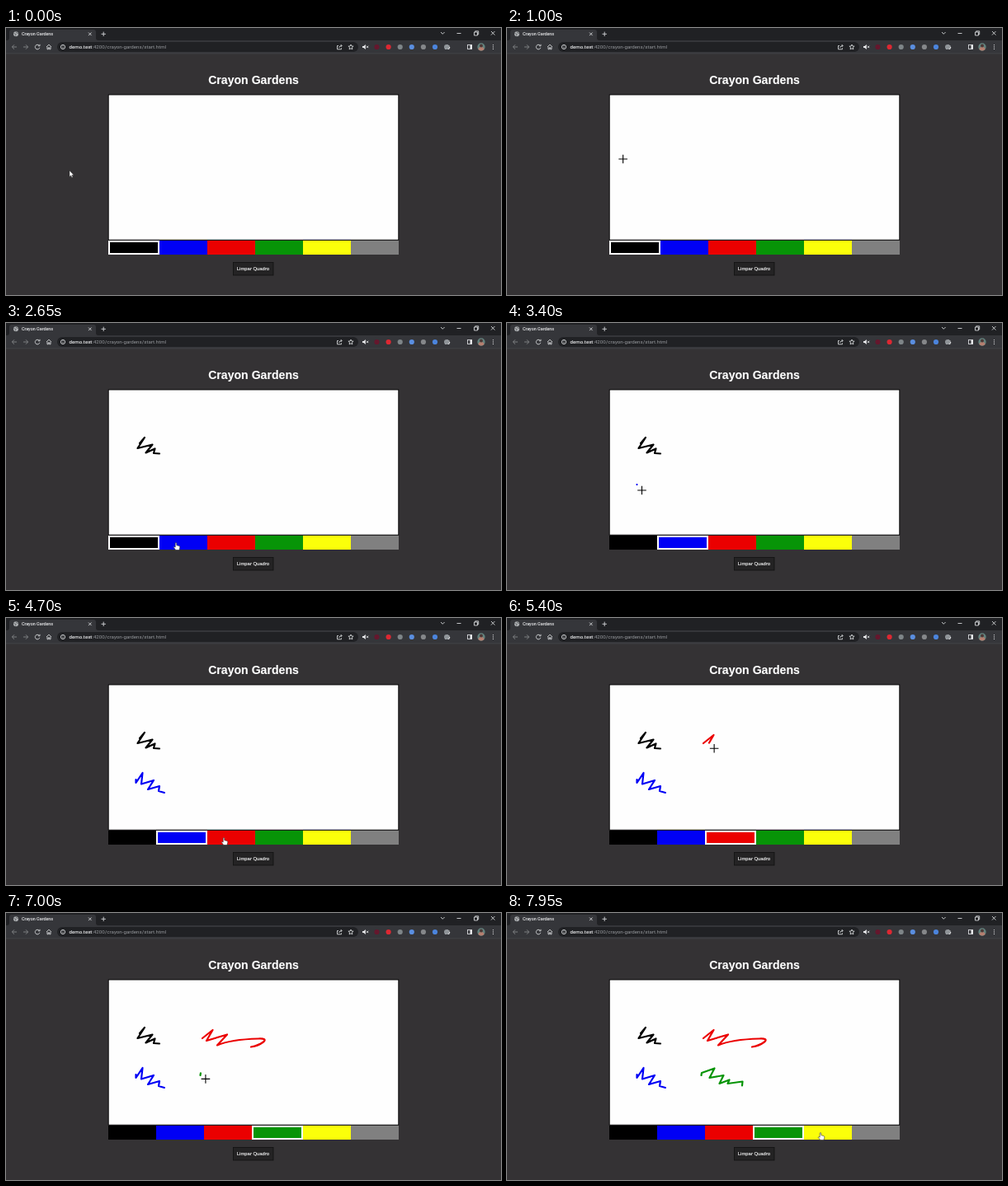
An HTML page that plays this animation: 600 by 324 pixels, repeating every 8 s.

```html
<!DOCTYPE html>
<html lang="pt">
<head>
<meta charset="utf-8">
<title>Crayon Gardens</title>
<style>
  html, body { margin: 0; width: 100%; height: 100%; overflow: hidden; background: #343234; }
  svg { display: block; width: 100vw; height: 100vh; }
  text { font-family: Roboto, sans-serif; fill: #e8e9eb; stroke: #e8e9eb; stroke-width: .12; }
  .muted { fill: #96999d; stroke: none; }
  .page { font-family: "Liberation Sans", Arial, sans-serif; text-anchor: middle; fill: #fff; }
  .icon { fill: none; stroke: #d4d6d9; stroke-width: .9; }
  .solid { fill: #e8e9eb; }
  .dim { stroke: #85878a; }
  .ink { fill: none; stroke-width: 2.2; stroke-linecap: round; stroke-linejoin: round; }
</style>
</head>
<body>
<svg viewBox="0 0 600 324">
  <rect width="600" height="324" fill="#343234"/>

  <!-- browser bar -->
  <rect width="600" height="16" fill="#202124"/>
  <path d="M1 15Q4 15 4 12V5Q4 2 7 2H106Q109 2 109 5V12Q109 15 112 15Z" fill="#35363a"/>
  <rect y="15" width="600" height="16" fill="#35363a"/>
  <rect y="30.6" width="600" height=".7" fill="#48494c"/>
  <rect x="62" y="17" width="365" height="12" rx="6" fill="#202124"/>
  <circle cx="12" cy="7.3" r="3" fill="#aeb0b3"/>
  <path d="M9.5 6.5l2.5 1-.5 2M12 4.6l1 1.5 1.8.3" fill="none" stroke="#55575a" stroke-width=".8"/>
  <text x="19" y="9.2" font-size="5.4">Crayon Gardens</text>
  <text x="76.5" y="25.2" font-size="6.2">demo.test<tspan class="muted">:4200/crayon-gardens/start.html</tspan></text>
  <g class="icon">
    <path d="M100 5.5l3.6 3.6m0-3.6l-3.6 3.6M115.5 7.3h5.4m-2.7-2.7v5.4"/>
    <path d="M527 5l2.3 2.3L531.6 5M546.5 6.5h5M588 4l4.5 4.5m0-4.5L588 8.500"/>
    <path d="M567.5 5h4v4h-4zm1.2 0V3.8h4v4h-1.200"/>
    <path class="dim" d="M13 23H7.500M10 20.300L7.300 23l2.700 2.700M21 23h5.500M24 20.300l2.700 2.700-2.700 2.700"/>
    <path d="M40.200 21.200A2.800 2.800 0 1 0 40.800 23.800M41 19.800v2h-2"/>
    <path d="M49 23l3-2.800 3 2.800m-5 0v2.800h1.300v-2h1.400v2H54V23"/>
  </g>
  <g class="icon" stroke-width=".7">
    <circle cx="69" cy="23" r="2.6"/><path d="M69 22.700v1.700m0-3v.6"/>
    <path d="M403 21.500h-1.500v4.300h5v-1.500m-3-.3q.5-2.500 3.500-2.500M405.700 20l1.500 1.500-1.500 1.500"/>
    <path d="M418 20l.9 2 2.200.2-1.700 1.500.5 2.200-1.900-1.100-1.900 1.100.5-2.200-1.700-1.500 2.200-.2z"/>
    <path d="M437 21.700l2.300 2.400m0-2.400L437 24.100"/>
    <rect x="559.5" y="20.5" width="5" height="5"/>
  </g>
  <path class="solid" d="M432 22h1.500l2.300-2v6l-2.300-2H432zM562.5 20.500h2.500v5h-2.500z"/>
  <path class="solid" d="M532 21h1.700a1 1 0 0 1 2 0h1.600v1.700a1 1 0 0 1 0 2V26H532z"/>
  <g id="badges"></g>
  <circle cx="576" cy="23" r="4.7" fill="#62827d"/>
  <path d="M572.5 26a3.500 3 0 0 1 7 0q-3.500 3-7 0" fill="#b57f70"/>
  <circle cx="576" cy="21.5" r="1.9" fill="#4b3735"/>
  <path d="M590.5 20.600v6" stroke="#d5d6d8" stroke-width="1.3" stroke-linecap="round" stroke-dasharray=".01 2.4"/>

  <!-- page -->
  <text class="page" x="300" y="68" font-size="14.1" font-weight="bold">Crayon Gardens</text>
  <rect x="124.2" y="81" width="351.600" height="176.200" fill="#fefefe" stroke="#000" stroke-width=".9"/>
  <g id="swatches"></g>
  <rect x="275.500" y="284.500" width="48.500" height="15.500" fill="#242324" stroke="#111" stroke-width=".8"/>
  <text class="page" x="299.500" y="294.300" font-size="5.900">Limpar Quadro</text>

  <!-- scribbles -->
  <path class="ink" d="M162 146l6-7-8.500 13 18-4.500-8 10 11-5-1.500 5.500 7 .5"/>
  <path class="ink" d="M157.500 196v4l8-12-1.500 13.500 15-4.500-7 11 14-4-1 6 7 2"/>
  <path class="ink" d="M238 152l12.500-10-7.500 13 25-7.500-12 13q16-7 50-8 11-.5 6 4-6 4.500-15 6"/>
  <path class="ink" d="M235.500 197l.5-3 15.500-5.500-6 11.500 17-3-5 10 12-4.500-2 4.500 18-2.500-.5 5"/>

  <g id="cursor">
    <path id="arrow" d="M0 0V7.400L1.700 5.900 2.800 8.400 4 7.900 2.900 5.500H5.200Z" fill="#fff" stroke="#222" stroke-width=".4"/>
    <path id="cross" d="M-5.300 0H5.300M0-5.300V5.300" stroke="#000" stroke-width="1.1"/>
    <path id="hand" d="M-.8.5Q0-.7.8.5V3.200L4 4Q5 4.400 4.800 5.700L4 9H-.2L-2.800 5.700Q-2.600 4.500-.8 5.600Z" fill="#fff" stroke="#222" stroke-width=".55"/>
  </g>
</svg>

<script>
const LOOP = 8000, STEP = 50;
const LEFT = 124, ROW = 258, CELL = 58, EDGE = 2, ROW_HEIGHT = 17;
const $ = id => document.getElementById(id);
const set = (el, attrs) => Object.entries(attrs).forEach(([key, value]) => el.setAttribute(key, value));
const add = (parent, tag, attrs) => {
  const el = parent.appendChild(document.createElementNS(parent.namespaceURI, tag));
  set(el, attrs);
  return el;
};
const progress = (t, from, to) => Math.max(0, Math.min(1, (t - from) / (to - from)));
const easeOut = k => 1 - (1 - k) ** 3;
const easeBoth = k => k * k * (3 - 2 * k);
const mix = (a, b, k) => a.map((v, i) => v + (b[i] - v) * k);

['#65172d', '#dd2832', '#7e8588', '#5a8ee0', '#85878a', '#4b84dc', '#909599'].forEach((fill, i) =>
  add($('badges'), 'circle', { cx: 449.5 + 14.1 * i, cy: 23, r: 3.1, fill }));

// The chosen swatch gains a white border and pushes its neighbours
const colors = ['#000', '#0000f5', '#eb0000', '#079407', '#fbff0a', '#808080'];
const frame = add($('swatches'), 'rect', { y: ROW, height: ROW_HEIGHT, width: CELL + 2 * EDGE, fill: '#fff' });
const cells = colors.map(fill => add($('swatches'), 'rect', { width: CELL, fill }));

function choose(chosen) {
  set(frame, { x: LEFT + CELL * chosen });
  cells.forEach((cell, i) => {
    const inset = i === chosen ? EDGE : 0;
    const shift = EDGE * (1 + Math.sign(i - chosen));
    set(cell, { x: LEFT + CELL * i + shift, y: ROW + inset, height: ROW_HEIGHT - 2 * inset });
  });
}

// Each scribble ends with a trip to the next swatch, picked shortly before the next start
const starts = [1700, 3400, 5280, 6985, 8750];
const strokes = [...document.querySelectorAll('.ink')].map((path, i) => {
  set(path, { stroke: colors[i] });
  const length = path.getTotalLength();
  const point = d => {
    const { x, y } = path.getPointAtLength(d);
    return [x + 6, y + 7];
  };
  return { path, length, point, start: starts[i], end: starts[i] + 350 + 2.2 * length, pick: starts[i + 1] - 550 };
});

function pointer(t) {
  const i = strokes.findLastIndex(s => t >= s.start);
  if (i < 0) return mix([77, 173], strokes[0].point(0), easeBoth(progress(t, 300, 1400)));
  const { point, length, start, end, pick } = strokes[i];
  if (t < end) return point(length * progress(t, start, end));
  const swatch = [LEFT + 24 + CELL * (i + 1), ROW + 8.5];
  if (t < pick) return mix(point(length), swatch, easeOut(progress(t, end, pick - 250)));
  return mix(swatch, strokes[i + 1].point(0), easeBoth(progress(t, pick, pick + 400)));
}

function draw(t) {
  choose(strokes.filter(s => t >= s.pick).length);
  for (const { path, start, end, length } of strokes) {
    path.style.display = t < start ? 'none' : '';
    path.style.strokeDasharray = `${Math.max(.1, length * progress(t, start, end) * 1.01)} ${length + 9}`;
  }
  const [x, y] = pointer(t);
  const inside = x > LEFT && x < 476 && y > 81 && y < ROW + ROW_HEIGHT;
  const kind = !inside ? 'arrow' : y < ROW ? 'cross' : 'hand';
  for (const id of ['arrow', 'cross', 'hand']) $(id).style.display = id === kind ? '' : 'none';
  set($('cursor'), { transform: `translate(${x} ${y})` });
}

const origin = performance.now();
function tick() {
  const t = (performance.now() - origin) % LOOP;
  draw(Math.floor(t / STEP) * STEP);
  requestAnimationFrame(tick);
}
tick();
</script>
</body>
</html>
```
